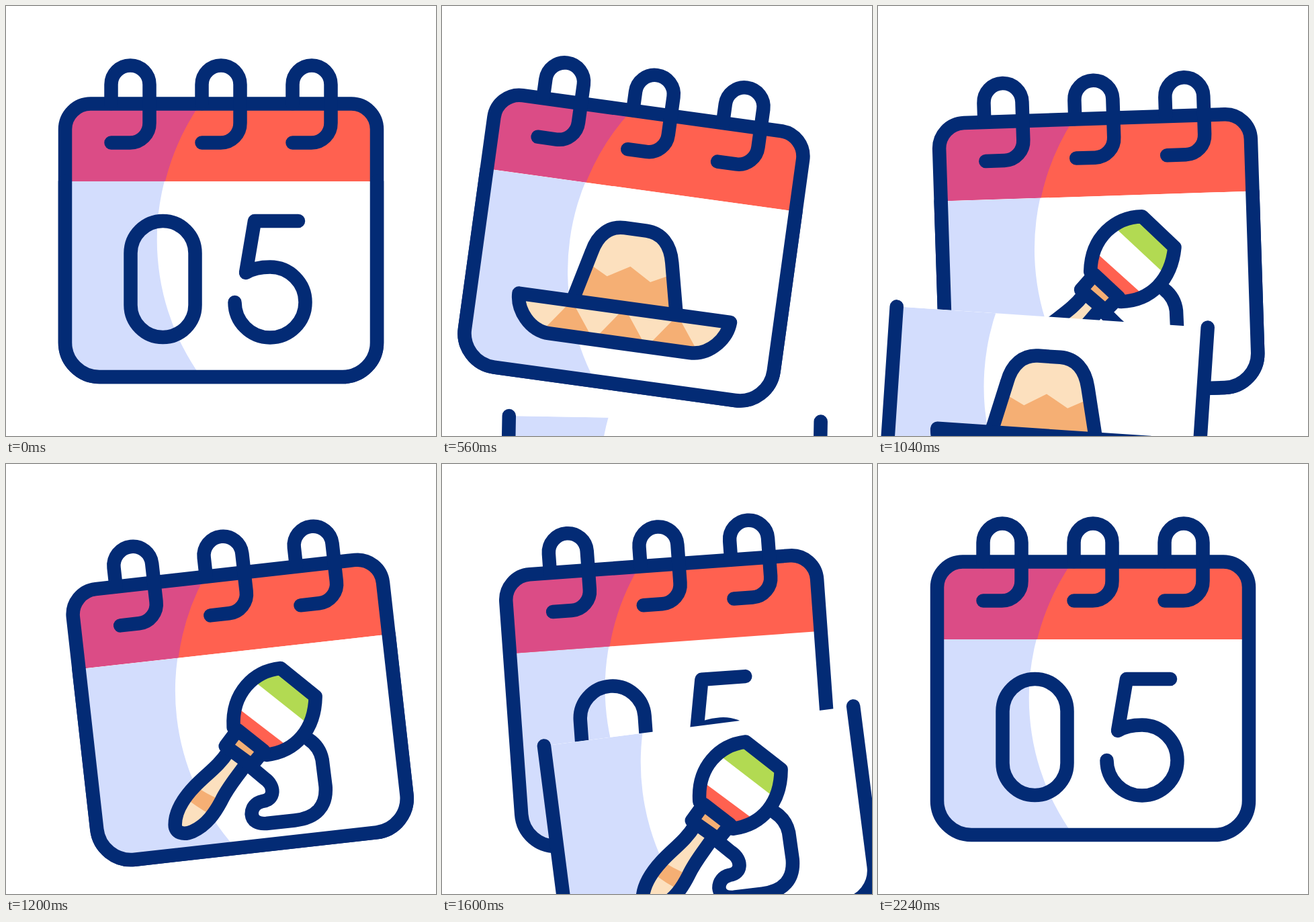
Write an HTML page that moves like this. It is 640 by 640 pixels and loops after 2.28 s.

```html
<!DOCTYPE html>
<html lang="en">
<head>
<meta charset="utf-8">
<title>Calendar</title>
<style>
  html, body { margin: 0; width: 100%; height: 100%; overflow: hidden; background: #fff; }
  svg { display: block; width: 100vw; height: 100vh; }
  .line { fill: none; stroke: #032b75; stroke-width: 20.5; stroke-linecap: round; stroke-linejoin: round; }
  .spark { fill: none; stroke: #ffcb4f; stroke-width: 20; stroke-linecap: round; }
  .shade { fill: #d3ddfd; }
  .light { fill: #fce0be; }
  .tan { fill: #f5af74; }
  .red { fill: #ff6150; }
  .pink { fill: #db4c86; }
  .green { fill: #b2da52; }
  .white { fill: #fff; }
</style>
</head>
<body>
<svg viewBox="0 0 640 640">
  <defs>
    <path id="body" d="M88 183.500a38 38 0 0 1 38-38H514a38 38 0 0 1 38 38V501a51 51 0 0 1-51 51H139a51 51 0 0 1-51-51Z"/>
    <path id="sheet" d="M88 261V501a51 51 0 0 0 51 51H501a51 51 0 0 0 51-51V261"/>
    <path id="shadow" d="M88 145H289.6A350 350 0 0 0 289.6 551H88Z"/>
    <path id="ring" d="M156.500 145V117a28.500 28.500 0 0 1 57 0V174a29 29 0 0 1-29 29.500H156.500"/>
    <path id="crown" d="M241 438L259.500 362C265 335 281 320 303 320H336C358 320 374 335 380 362L397 438"/>
    <path id="brim" d="M160.500 438H478C477 462 455 491 424 491H214C183 491 161 462 160.500 438Z"/>
    <path id="head" d="M409 304C370 308 336 340 339 392L388 433C432 428 460 395 461 346Z"/>
    <path id="handle" d="M331 428C317 450 298 462 281 480C263 499 252 519 252 537C252 549 264 553 278 547C300 537 312 518 321 501C330 482 341 470 358 446"/>
    <path id="collar" d="M345 396L384 427L366 448.500L327 420Z"/>
    <clipPath id="bodyClip"><use href="#body"/></clipPath>
    <clipPath id="sheetClip"><use href="#sheet"/></clipPath>
    <clipPath id="crownClip"><use href="#crown"/></clipPath>
    <clipPath id="brimClip"><use href="#brim"/></clipPath>
    <clipPath id="headClip"><use href="#head"/></clipPath>
    <clipPath id="handleClip"><use href="#handle"/></clipPath>

    <g id="blank">
      <use href="#sheet" class="white"/>
      <use href="#shadow" class="shade" clip-path="url(#sheetClip)"/>
      <use href="#sheet" class="line"/>
    </g>

    <g id="date" class="line">
      <rect x="185.5" y="320" width="96" height="173" rx="48"/>
      <path d="M435 320H370L357 397C367 391 380 388.5 393 388.5A52.5 52.5 0 1 1 340.5 441"/>
    </g>

    <g id="hat">
      <use href="#crown" class="light"/>
      <path class="tan" clip-path="url(#crownClip)" d="M250 376L287 395L319.5 376L352 395L389 376L400 438H240Z"/>
      <use href="#crown" class="line"/>
      <use href="#brim" class="light"/>
      <path class="tan" clip-path="url(#brimClip)" d="M240 438l34 46h-68ZM319.5 438l34 46h-68ZM399 438l34 46h-68Z"/>
      <use href="#brim" class="line"/>
    </g>

    <g id="maraca" transform="translate(320 320) rotate(6.4) translate(-346 -338)">
      <path class="line" d="M360 447L385 468C402 480 400 500 382 502C372 504 366 512 366 521C367 532 376 536 388 535L430 530.5C462 527 478 510 476 480L471 440C468 425 460 416 451 410"/>
      <use href="#handle" class="light"/>
      <path class="tan" clip-path="url(#handleClip)" d="M282 479Q298 491 320 500L306 522Q287 513 268 497Z"/>
      <use href="#handle" class="line"/>
      <use href="#head" class="white"/>
      <g clip-path="url(#headClip)">
        <path class="green" d="M363 318L460 395L490 340L400 280Z"/>
        <path class="red" d="M336 356L428 426.5L388 450L320 400Z"/>
      </g>
      <use href="#head" class="line"/>
      <use href="#collar" class="tan"/>
      <use href="#collar" class="line"/>
    </g>
  </defs>

  <g id="calendar">
    <use href="#body" class="white"/>
    <g clip-path="url(#bodyClip)">
      <use href="#shadow" class="shade"/>
      <rect class="red" x="88" y="145" width="464" height="116"/>
      <path class="pink" d="M88 145H289.6A350 350 0 0 0 237 261H88Z"/>
    </g>
    <use href="#body" class="line"/>
    <use href="#ring" class="line"/>
    <use href="#ring" class="line" x="135"/>
    <use href="#ring" class="line" x="270"/>
    <use href="#date"/>
    <path id="sparks" class="spark"/>
  </g>
  <g id="page3"><use href="#blank"/><use href="#maraca"/></g>
  <g id="page2"><use href="#blank"/><use href="#hat"/></g>
  <g id="page1"><use href="#blank"/><use href="#date"/></g>
</svg>
<script>
const LOOP = 2280, STEP = 40, GRAVITY = 0.00147;
const $ = id => document.getElementById(id);

// Smooth track through [time, value] keys, flat at the peaks.
function track(keys) {
  const slope = i => (keys[i + 1][1] - keys[i][1]) / (keys[i + 1][0] - keys[i][0]);
  const tangents = keys.map((_, i) => {
    if (i === 0 || i === keys.length - 1) return 0;
    const a = slope(i - 1), b = slope(i);
    return a * b <= 0 ? 0 : 2 * a * b / (a + b);
  });
  return t => {
    if (t <= keys[0][0]) return keys[0][1];
    const i = keys.findIndex((k, n) => n < keys.length - 1 && t < keys[n + 1][0]);
    if (i < 0) return keys[keys.length - 1][1];
    const [t0, v0] = keys[i], [t1, v1] = keys[i + 1];
    const h = t1 - t0, u = (t - t0) / h, w = 1 - u;
    return v0 * (1 + 2 * u) * w * w + v1 * u * u * (3 - 2 * u)
      + h * u * w * (tangents[i] * w - tangents[i + 1] * u);
  };
}

const tilt = track([[0, 0], [560, 7.85], [630, 8.1], [880, 3.5], [1200, -6.4],
  [1310, -7.3], [1440, -6.5], [1800, -0.2], [1980, 3.1], [2240, 0]]);
const drop = track([[0, 0], [560, 14.6], [880, 22], [980, 22.5], [1200, 19.4],
  [1440, 10.4], [1800, 0.4], [1880, 0]]);
const sparkOut = track([[1760, 0], [1800, 10.6], [1960, 32]]);
const sparkIn = track([[1880, 0], [2120, 32]]);

// Each page hangs on the calendar until it is released, then falls.
const pages = [
  { el: $('page1'), from: 0, release: 80, drift: 0.031, spin: 0.0014 },
  { el: $('page2'), from: 80, release: 690, drift: -0.141, spin: -0.011 },
  { el: $('page3'), from: 690, release: 1308, drift: 0.138, spin: 0 },
];

function place(el, x, y, angle) {
  el.setAttribute('transform', `translate(${x} ${y}) rotate(${angle} 320 90)`);
}

function sparkPath(a, b) {
  if (b - a < 0.1) return '';
  const point = (sx, sy, d) => `${320.4 + sx * (165 + 0.753 * d)} ${398 + sy * (87.5 + 0.66 * d)}`;
  return [[-1, -1], [1, -1], [-1, 1], [1, 1]]
    .map(([sx, sy]) => `M${point(sx, sy, a)}L${point(sx, sy, b)}`).join('');
}

function draw(t) {
  const y = drop(t);
  place($('calendar'), 0, y, tilt(t));
  for (const p of pages) {
    const age = Math.max(0, t - p.release);
    const fall = GRAVITY * age * age;
    p.el.style.display = t < p.from || fall > 480 ? 'none' : '';
    place(p.el, p.drift * age, y + fall, tilt(Math.min(t, p.release)) + p.spin * age);
  }
  $('sparks').setAttribute('d', sparkPath(sparkIn(t), sparkOut(t)));
}

function tick() {
  draw(Math.floor(performance.now() % LOOP / STEP) * STEP);
  requestAnimationFrame(tick);
}
tick();
</script>
</body>
</html>
```
